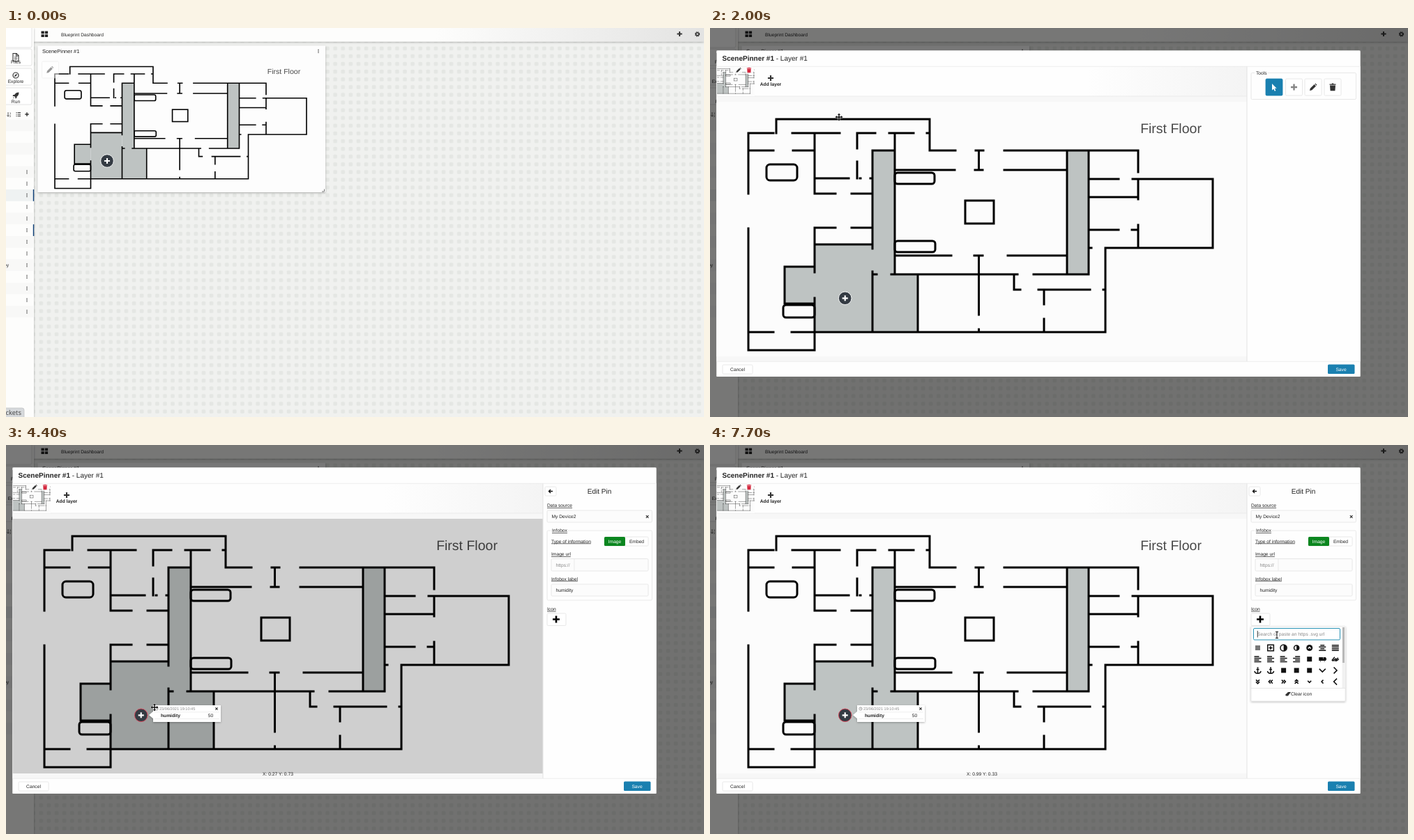
Animation of 1001x559 px, one loop 8 s. Source, as an HTML page:

```html
<!DOCTYPE html>
<html lang="en">
<head>
<meta charset="utf-8">
<title>Blueprint Dashboard</title>
<style>
html, body { margin: 0; width: 1001px; height: 559px; overflow: hidden; background: #f0f1ef; }
svg { display: block; }
text { font: 6.7px "Liberation Sans", Arial, sans-serif; fill: #222; text-rendering: geometricPrecision; white-space: pre; }
.b { font-weight: bold; }
.m { text-anchor: middle; }
.dot { text-decoration: underline dotted .7px; text-underline-offset: 1.5px; }
.line { fill: none; stroke: #111; }
.tool rect { fill: #fff; stroke: #e2e2e2; stroke-width: .8; }
.tool path { fill: #333; }
.tool.on rect { fill: #1a80b0; stroke: #1a80b0; }
.tool.on path { fill: #fff; }
</style>
</head>
<body>
<svg id="stage" width="1001" height="559" viewBox="0 0 1001 559"></svg>
<script>
const BLUE = '#1a80b0';
const PLUS = 'M-1.2-4.5H1.2V-1.2H4.5V1.2H1.2V4.5H-1.2V1.2H-4.5V-1.2H-1.2z';
const PENCIL = 'M-5 5L-4.2 1.8 1.6-4 4-1.6-1.8 4.2zM2.3-4.7L3.2-5.5 5.5-3.2 4.7-2.3z';
const TRASH = 'M-4.5-4.5H-1.5L-1-5.4H1L1.5-4.5H4.5V-3.2H-4.5zM-4-2.5H4L3.4 5.2H-3.4z';
const ARROW = 'M0 0V10L2.4 7.8 4 11.2 5.6 10.4 4 7.2H7z';

const rect = (x, y, x2, y2, fill, more = '') =>
  `<rect x="${x}" y="${y}" width="${x2 - x}" height="${y2 - y}" fill="${fill}" ${more}/>`;
const text = (x, y, s, cls = '', style = '') => `<text x="${x}" y="${y}" class="${cls}" style="${style}">${s}</text>`;
const icon = (d, x, y, size = 1, more = 'fill="#333"') =>
  `<path d="${d}" transform="translate(${x} ${y}) scale(${size})" ${more}/>`;
const line = (d, width = 1, color = '#111') => `<path class="line" d="${d}" style="stroke:${color};stroke-width:${width}"/>`;
const circle = (x, y, r, more) => `<circle cx="${x}" cy="${y}" r="${r}" ${more}/>`;
const group = (id, body, more = '') => `<g id="${id}" ${more}>${body}</g>`;
const EDGE = 'stroke="#e3e3e3" stroke-width=".8" rx="1.5"';
const cross = (x, y, r) => line(`M${x - r} ${y - r}l${2 * r} ${2 * r}m0 ${-2 * r}l${-2 * r} ${2 * r}`, 1.2, '#333');
const kebab = (x, y) => [-2, 0, 2].map(d => rect(x - .6, y + d - .6, x + .6, y + d + .6, '#333')).join('');

// Wall runs: [fixed coordinate, from, to, from, to, ...]
const acrossWalls = [
  [131, 95, 315], [151, 55, 91, 118, 186, 212, 237, 257, 292, 311, 315],
  [176, 55, 91, 119, 150, 233, 265, 315, 352, 381, 392, 422, 614],
  [204, 265, 351, 380, 391, 422, 512], [216, 150, 199, 215, 216, 230, 233],
  [217, 543, 586, 606, 721], [238, 150, 180, 203, 233], [243, 543, 614],
  [287, 150, 180, 203, 233], [290, 543, 586, 605, 614], [311, 150, 233],
  [316, 543, 547, 567, 721], [327, 265, 346, 379, 391, 427, 512], [343, 107, 150],
  [354, 233, 239, 260, 441, 464, 543], [376, 436, 445, 471, 545, 564, 567],
  [396, 107, 150], [437, 55, 91, 117, 567], [463, 55, 150]];
const downWalls = [
  [55, 151, 238, 288, 463], [95, 131, 151], [107, 343, 396], [150, 151, 238, 287, 351, 388, 463],
  [211, 151, 173, 192, 216], [233, 176, 317, 350, 437], [265, 151, 354], [298, 354, 437],
  [315, 131, 176], [385.5, 176, 204, 327, 412, 433, 437], [436, 354, 376], [479, 376, 397, 418, 437],
  [512, 176, 354], [543, 176, 354], [567, 316, 437], [614, 176, 207, 217, 246, 283, 316], [721, 217, 316]];
const runs = (list, draw) => list.map(([at, ...ends]) => {
  let d = '';
  for (let i = 0; i < ends.length; i += 2) d += draw(at, ends[i], ends[i + 1]);
  return d;
}).join('');
const walls = runs(acrossWalls, (y, a, b) => `M${a} ${y}H${b}`) + runs(downWalls, (x, a, b) => `M${x} ${a}V${b}`);

const GREY = '#bec3c2';
const plan = group('plan',
  rect(150, 311, 233, 437, GREY) + rect(107, 343, 150, 396, GREY) + rect(233, 354, 298, 437, GREY) +
  rect(233, 176, 265, 354, GREY) + rect(512, 176, 543, 354, GREY) +
  `<g fill="none" stroke="#000" stroke-width="3"><path stroke-linecap="square" d="${walls}"/>` +
  rect(366, 248, 407, 281, 'none') + rect(81, 196, 125, 219, 'none', 'rx="5"') +
  rect(265, 208, 322, 224, 'none', 'rx="4"') + rect(265, 306, 323, 322, 'none', 'rx="4"') +
  rect(105, 398, 150, 416, 'none', 'rx="4"') + '</g>' +
  text(661, 151.3, 'First Floor', 'm', 'font-size:19.5px;fill:#4a4a4a'));
const usePlan = transform => `<use href="#plan" transform="${transform}"/>`;
const pin = (x, y, id) => circle(x, y, 9.3, `id="${id}" fill="#343b43" stroke="#fff" stroke-width=".9"`) +
  icon(PLUS, x, y, .9, 'fill="#fff"');

const defs = `<defs>
  <pattern id="dots" width="11.1" height="11.1" x="45" y="24" patternUnits="userSpaceOnUse">
    <rect x="2.5" y="2.5" width="5.6" height="5.6" rx="1.5" fill="#e4e6e3"/></pattern>
  <linearGradient id="bar"><stop offset=".6" stop-color="#fdfdfc"/><stop offset="1" stop-color="#e3e3e2"/></linearGradient>
  <linearGradient id="strip"><stop offset=".7" stop-color="#fefefe"/><stop offset="1" stop-color="#f4f4f4"/></linearGradient>
  <filter id="soft" x="-20%" y="-20%" width="140%" height="150%">
    <feDropShadow dx="0" dy="1" stdDeviation="1.6" flood-opacity=".3"/></filter>
  <clipPath id="thumb">${rect(10, 55.5, 64, 98, '#000')}</clipPath>${plan}</defs>`;

function sidebar() {
  let s = rect(0, 0, 40, 559, '#fdfdfc', 'filter="url(#soft)"');
  [-2, 30, 58, 86].forEach(y => s += rect(-6, y, 37, y + (y < 0 ? 30 : 24), '#fff', 'stroke="#dedede" stroke-width=".8" rx="2"'));
  s += line('M10 36.5h5l3 3v8h-8zM14.5 36.5v3.5h3.500M12 42h4M12 44.500h4', 1.1, '#333') + text(14, 51, 'Files', 'm');
  s += circle(14, 68, 4, 'fill="none" stroke="#333" stroke-width="1.2"') + icon('M2.5-2.5L.8.8-2.500 2.500-.8-.8z', 14, 68) + text(14, 79, 'Explore', 'm');
  s += icon('M5-5C1-5-1-3-2-1H-4L-5 1-2 1.500-1 2-.5 5 1.500 4V2C3 1 5-1 5-5zM-3 2.500L-5 5-2.500 3.500z', 14, 97, .9) + text(14, 107.5, 'Run', 'm');
  for (let i = 0; i < 17; i++) {
    const y = 140 + i * 16.73;
    if (i % 2 == 0) s += rect(0, y - 8.4, 39, y + 8.4, i == 6 ? '#eff2f2' : '#f8f8f7');
    if (i > 3) s += kebab(30, y);
    if (i == 6 || i == 9) s += rect(38.8, y - 8.4, 40.2, y + 8.4, '#0d3f78');
  }
  s += text(-3, 343, 'by') + line('M3 121v6m-1.500-1.500l1.500 1.700 1.500-1.700', .8, '#333') +
    text(5, 123.5, '1', '', 'font-size:4px') + text(5, 127.5, '2', '', 'font-size:4px') +
    line('M14.500 121.500h1.200m1 0h4.300M14.500 124h1.200m1 0h4.300M14.500 126.500h1.200m1 0h4.300', 1.2, '#333') + icon(PLUS, 30, 124, .6);
  return s;
}

function dashboard() {
  return rect(0, 0, 1001, 559, '#f0f1ef') + rect(40, 20, 1001, 559, 'url(#dots)') +
    rect(40, 0, 1001, 19.5, 'url(#bar)', 'filter="url(#soft)"') + sidebar() +
    [50.5, 55.8].map(x => rect(x, 4.5, x + 4.3, 8.2, '#222') + rect(x, 9.3, x + 4.3, 13, '#222')).join('') +
    text(79, 11.5, 'Blueprint Dashboard') + icon(PLUS, 966, 8.5, .8) +
    circle(991.5, 8.8, 2.9, 'fill="none" stroke="#333" stroke-width="1.5" stroke-dasharray="1.5 .78"') +
    circle(991.5, 8.8, 1.9, 'fill="none" stroke="#333" stroke-width="1.3"') +
    rect(45.5, 25.5, 458, 236, '#fdfdfd', 'filter="url(#soft)"') +
    text(52, 36.3, 'ScenePinner #1', '', 'font-size:7.5px') + kebab(448, 33.3) +
    usePlan('translate(40.19 -13.54) scale(.542 .527)') +
    pin(145, 191, 'cardPin') + line('M453 235h3.500v-3.500', 1, '#777') +
    group('editCard', rect(51.5, 48, 75.5, 72, '#fff', EDGE) + icon(PENCIL, 63, 60, .95));
}

const tool = (id, x, d, y = 85, size = 1) =>
  `<g id="${id}" class="tool">${rect(x - 12, 73, x + 12, 97, '#fff', 'rx="1.5"')}${icon(d, x, y, size, '')}</g>`;

const tools = () => rect(776, 64.5, 926.5, 102.5, 'none', EDGE) + rect(781, 62, 800, 67, '#fefefe') + text(783, 66.7, 'Tools') +
  tool('select', 809, ARROW, 80, .95).replace('translate(809', 'translate(806') + tool('add', 837.5, PLUS).replace('<path', '<path opacity=".6"') +
  tool('edit', 865, PENCIL) + tool('remove', 893, TRASH) +
  group('tip', rect(853, 55.5, 887, 73, BLUE, 'rx="1.5"') + text(870, 66.7, 'Edit pin', 'm', 'fill:#fff'));

const legend = (x, y, s) => text(x, y, s, 'dot');
const field = (x, y, y2, s) => rect(x, y, x == 776 ? 926.5 : 921, y2, '#fcfcfc', EDGE) + text(x + 6.5, (y + y2) / 2 + 2.3, s);

function pinForm() {
  return rect(773, 60, 789, 73, '#fff', EDGE) + line('M784 66.500h-5.500m2.500-2.500l-2.500 2.500 2.500 2.500', 1.4) +
    text(851, 69.8, 'Edit Pin', 'm', 'font-size:10px') +
    legend(776, 89, 'Data source') + field(776, 94, 111, 'My Device2') + cross(919.7, 103, 1.8) +
    rect(776, 123, 926.5, 223, 'none', EDGE) + rect(781, 120, 806, 126, '#fefefe') + legend(783, 125, 'Infobox') +
    legend(782, 140.5, 'Type of information') + rect(858, 132, 921, 145, '#fff', EDGE) +
    rect(858, 132, 888, 145, '#0b861f', 'rx="1.5"') + text(873, 140.8, 'Image', 'm', 'fill:#fff') + text(904.5, 140.8, 'Embed', 'm') +
    legend(782, 159, 'Image url') + field(782, 163.5, 181, '<tspan fill="#888">https://</tspan>') + line('M815 164v17', .8, '#e6e6e6') +
    legend(782, 194.5, 'Infobox label') + field(782, 200, 217, 'humidity') +
    legend(776, 237.8, 'Icon') + rect(776, 242, 803, 259.5, '#fff', EDGE) + icon(PLUS, 789, 250.5, 1.1, 'fill="#000"');
}

function iconPicker() {
  const bars = (a, b) => `M${a} -3.800H${b}M-5 -1.300H5M${a} 1.300H${b}M-5 3.800H5`;
  const mid = bars(-3, 3), full = bars(-5, 5), left = bars(-5, 2), right = bars(-2, 5);
  const square = 'M-3.500 0H3.500', anchor = 'M0-3V4.500M-2-1.500H2M-4.500 1C-4 5.500 4 5.500 4.500 1M-1-4H1';
  const half = r => `M0-${r}A${r} ${r} 0 0 0 0 ${r}A${r} ${r} 0 0 0 0-${r}`;
  const angle = (s, turn, double) => {
    const [x, y] = [[0, 1], [-1, 0], [1, 0], [0, -1]][turn];
    const v = o => `M${x * (o - s / 2) - y * s} ${y * (o - s / 2) - x * s}L${x * (o + s / 2)} ${y * (o + s / 2)}L${x * (o - s / 2) + y * s} ${y * (o - s / 2) + x * s}`;
    return double ? v(-1.5) + v(1.5) : v(0);
  };
  const van = 'M-5-1.500H1M-5 1H5M1.500-1.500H4L5 1M-3 3h.5M2.500 3h.5', signs = 'M-5 2L-1-3M-4 3L1-1M-1 3L4-2M1 3L5 0';
  const marks = [square, 'M-4.300-4.300H4.300V4.300H-4.300zM-2.500 0H2.500M0-2.500V2.500', half(4.6), half(3.6), 'M-2 1L0-1 2 1', mid, full,
    left, left, left, right, square, van, signs,
    anchor, anchor, square, square, square, angle(4.5, 0), angle(4.5, 2),
    angle(2.5, 0, 1), angle(2.5, 1, 1), angle(2.5, 2, 1), angle(2.5, 3, 1), angle(2.5, 0), angle(2.5, 1), angle(4.5, 1)];
  let s = rect(776, 261, 911, 368, '#fff', 'stroke="#ddd" stroke-width=".6" filter="url(#soft)"');
  marks.forEach((d, i) => {
    const x = 785.5 + i % 7 * 18.55, y = 291.5 + Math.floor(i / 7) * 16.2;
    const width = d == square ? 7 : d == van ? 2.4 : 1.5;
    if (i == 4) s += circle(x, y, 4.5, 'fill="#111"');
    if (i == 2 || i == 3) s += icon(`M0-${6 - i / 2}A4 4 0 0 1 0 ${6 - i / 2}z`, x, y, .85, 'fill="#111"');
    s += icon(d, x, y, 1, `class="line" style="stroke:${i == 4 ? '#fff' : i ? '#111' : '#777'};stroke-width:${width}"`);
  });
  return s + rect(906.5, 261.5, 910.5, 349, '#f1f1f1') + rect(907, 262, 910, 313, '#b9b9b9') +
    rect(779.5, 263.5, 903.5, 280, '#fff', 'id="search" stroke-width="1" rx="1.5"') +
    text(785, 274, 'Search or paste an https .svg url', '', 'fill:#888') + rect(784.8, 267, 785.6, 276.5, '#111', 'id="caret"') +
    line('M776 349.500H911', .7, '#ddd') + icon('M-4 1L0-3H4L0 2.500H-3z', 829, 358, 1) + text(833, 360.3, 'Clear icon');
}

const infoBox = () => `<g filter="url(#soft)"><path fill="#fff" d="M211 374H308V398H211V393L205 388 211 383z"/></g>` +
  circle(216, 379, 2.2, 'fill="none" stroke="#888" stroke-width=".7"') + line('M216 377.500v1.700h1.300', .6, '#888') +
  text(220, 381, '23/06/2021 19:10:45', '', 'font-size:5.6px;fill:#888') + cross(302, 379, 1.6) +
  line('M213 383.800H306M213 393.500H306', .5, '#ddd') + text(222, 390.8, 'humidity', 'b') + text(289.7, 390.8, '50');

function modal() {
  return '<path fill="#000" fill-opacity=".53" fill-rule="evenodd" d="M0 0H1001V559H0zM9.500 32.500H932.500V501H9.500z"/>' +
    rect(9.5, 32.5, 932.5, 501, '#fefefe', 'rx="1.5"') +
    text(17.5, 47, '<tspan class="b">ScenePinner #1</tspan> - Layer #1', '', 'font-size:10px') +
    rect(9.5, 55, 770, 98, 'url(#strip)') + rect(9.5, 98, 770, 479, '#f7f7f7') + line('M9.500 98H770', .8, '#e6e6e6') +
    rect(9.5, 106, 770, 472, '#fcfcfc') +
    `<g clip-path="url(#thumb)">${rect(10, 55, 64, 98, '#fcfcfc')}${usePlan('translate(-8 43.1) scale(.1155 .117)')}</g>` +
    rect(35, 55, 46, 66, '#fff', 'opacity=".8"') + rect(51, 55, 62, 66, '#fff', 'opacity=".8"') +
    icon(PENCIL, 41, 60.5, .7) + icon(TRASH, 56, 60.5, .7, 'fill="#d3283e"') +
    icon(PLUS, 87, 72, .9) + text(87, 83.3, 'Add layer', 'b m') + usePlan('') +
    rect(9.5, 106, 770, 472, '#000', 'id="shade"') +
    text(390, 293.7, 'Select a pin to edit', 'b m', 'font-size:13.6px;fill:#fff').replace('<text', '<text id="prompt"') +
    pin(193.7, 388.3, 'pin') + group('info', infoBox()) + text(390, 475, '', 'm').replace('<text', '<text id="coords"') +
    rect(770, 55, 932.5, 479, '#fefefe') + line('M770 55V479', 1, '#e2e2e2') + line('M9.500 55.300H932.500M9.500 479.300H932.500', .7, '#e8e8e8') +
    group('tools', tools()) + group('form', pinForm()) + group('picker', iconPicker()) +
    rect(18, 484, 61, 497, '#fff', EDGE) + text(39.5, 492.6, 'Cancel', 'm') +
    rect(886, 483.5, 924.5, 497, BLUE, 'rx="1.5"') + text(905, 492.6, 'Save', 'm', 'fill:#fff');
}

const outline = 'stroke="#fff" stroke-width=".8" paint-order="stroke"';
const cursors = group('cursor',
  group('arrow', icon(ARROW, 0, 0, 1, `fill="#111" ${outline}`)) +
  group('hand', icon('M-1 1Q0-.8 1 1V4.500L5 5.500Q6 6 5.500 8L4.500 12H-.8L-3.800 7.500Q-4 6-2.500 6.500L-1 8z', 0, 0, 1, 'fill="#fff" stroke="#111" stroke-width="1"')) +
  group('move', icon('M0-5.500L2-3H.7V-.7H3V-2L5.500 0 3 2V.7H.7V3H2L0 5.500-2 3H-.7V.7H-3V2L-5.500 0-3-2V-.7H-.7V-3H-2z', 0, 0, 1, `fill="#111" ${outline}`)) +
  group('beam', line('M-2-4.500H2M0-4.500V4.500M-2 4.500H2', 1)));

stage.innerHTML = defs + dashboard() +
  group('status', rect(-5, 546, 26, 562, '#d6d9dc', 'rx="3" stroke="#bbb" stroke-width=".6"') +
    text(22, 556.3, 'buckets', '', 'font:9.5px \'Open Sans\',sans-serif;text-anchor:end;fill:#444')) +
  group('modal', modal()) + cursors;

// Cursor stops: time, x, y, shape from that time on
const path = [
  [0, -12, 330, 'arrow'], [300, -8, 300, 'arrow'], [700, 82, 110, 'arrow'], [1100, 66, 55, 'arrow'], [1200, 67, 55, 'hand'],
  [1600, 67, 55, 'hand'], [1700, 90, 75, 'arrow'], [2000, 185, 128, 'move'], [2100, 185, 128, 'move'], [2500, 700, 100, 'arrow'],
  [2700, 855, 86, 'hand'], [2800, 864, 85, 'hand'], [3200, 864, 85, 'hand'], [3300, 620, 190, 'move'], [3400, 374, 294, 'move'],
  [3800, 215, 378, 'move'], [4000, 195, 385, 'hand'], [4200, 197, 384, 'hand'], [4400, 213, 377, 'move'], [5000, 287, 330, 'move'],
  [5300, 520, 156, 'move'], [5600, 786, 226, 'arrow'], [5700, 786, 226, 'arrow'], [5900, 808, 229, 'arrow'], [6100, 816, 225, 'arrow'],
  [6200, 816, 225, 'arrow'], [6600, 795, 246, 'hand'], [6800, 795, 246, 'hand'], [7200, 808, 270, 'beam'],
  [7300, 808, 270, 'beam'], [7600, 813, 273, 'beam'], [8000, 813, 273, 'beam']];
const dimming = [[0, 0], [3100, 0], [3200, .03], [3400, .3], [4200, .3], [4700, 0], [8000, 0]];

function follow(keys, t, column = 1) {
  const i = keys.findIndex(k => k[0] > t), a = keys[i - 1], b = keys[i];
  return a[column] + (b[column] - a[column]) * (t - a[0]) / (b[0] - a[0]);
}
const $ = id => document.getElementById(id);
const fade = (id, value) => $(id).setAttribute('opacity', +value);

function draw(t) {
  const x = follow(path, t), y = follow(path, t, 2);
  const shape = path.filter(k => k[0] <= t).pop()[3];
  const editing = t >= 4200, dim = follow(dimming, t);
  $('cursor').setAttribute('transform', `translate(${x} ${y})`);
  for (const id of ['arrow', 'hand', 'move', 'beam']) fade(id, id == shape);

  fade('status', t < 500);
  fade('editCard', t >= 1000 && t < 1600 ? 1 : .5);
  fade('modal', t < 1600 ? 0 : 1 - (1 - Math.min(1, (t - 1500) / 500)) ** 4);
  $('select').classList.toggle('on', t < 3200);
  $('edit').classList.toggle('on', t >= 2700);
  fade('tip', t >= 2700 && t < 3300);
  fade('shade', dim);
  fade('prompt', editing || t < 3200 ? 0 : Math.min(1, .5 + dim * 2));

  fade('tools', !editing);
  fade('form', editing);
  fade('info', editing);
  $('pin').setAttribute('stroke', editing ? '#e0485c' : '#fff');
  const inside = x < 770;
  const across = inside ? (x - 10) / 760 : .99, down = inside ? (y - 106) / 366 : .33;
  $('coords').textContent = editing ? `X: ${across.toFixed(2)} Y: ${(down - (inside ? .01 : 0)).toFixed(2)}` : '';

  fade('picker', t >= 6800);
  $('search').setAttribute('stroke', t >= 7400 ? '#2a93b5' : '#ddd');
  fade('caret', t >= 7400);
}

// The screen refreshes ten times a second
function tick(now) {
  draw(Math.floor(now % 8000 / 100) * 100);
  requestAnimationFrame(tick);
}
tick(performance.now());
</script>
</body>
</html>
```
